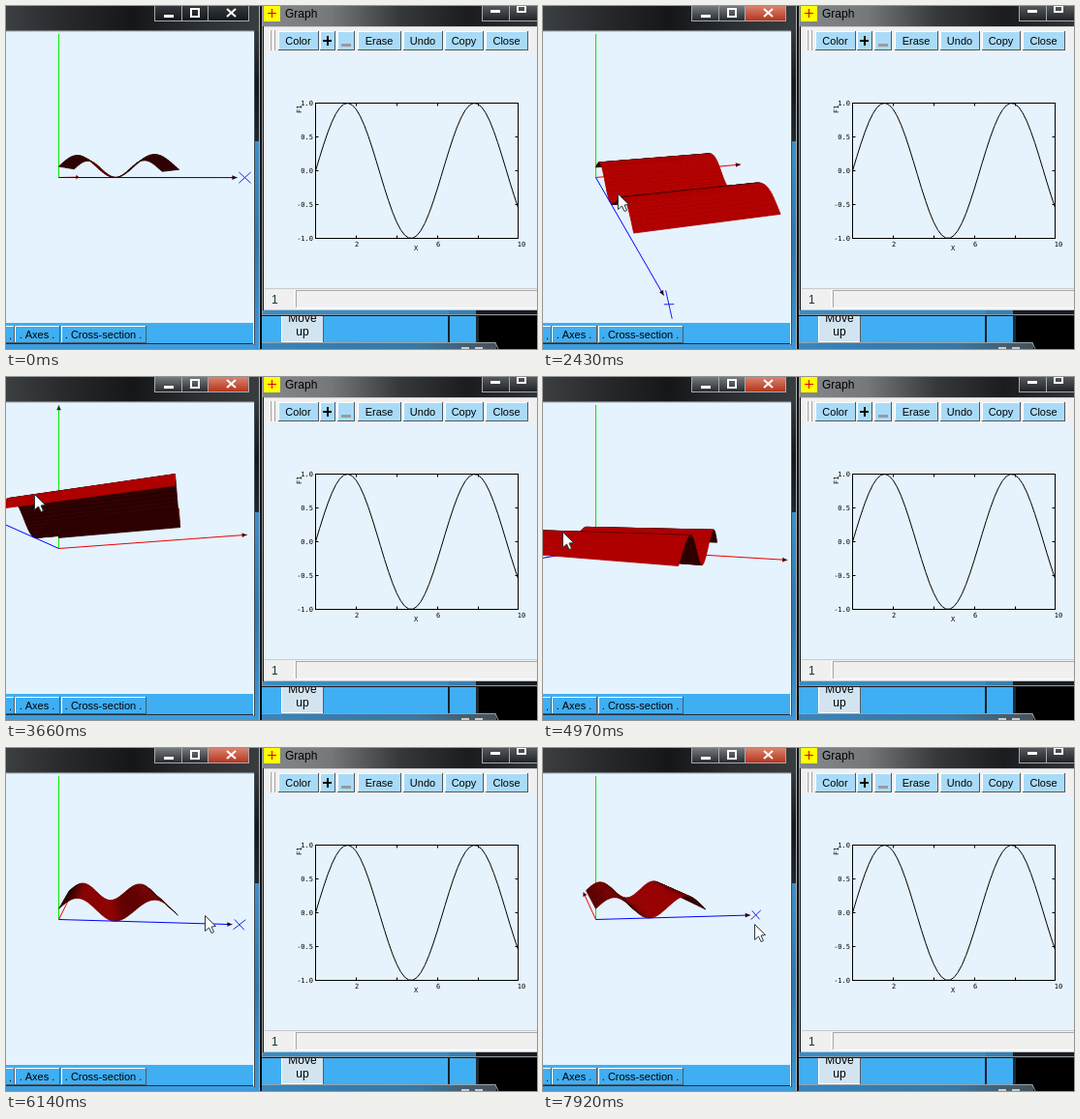
Recreate the animation shown at these times as an HTML page with a canvas. Size 548 by 355 pixels, loop 8000 ms.

```html
<!DOCTYPE html>
<html lang="en">
<head>
<meta charset="utf-8">
<title>Surface and graph</title>
<style>
html, body { margin: 0; width: 100%; height: 100%; overflow: hidden; background: #000; }
canvas { display: block; }
</style>
</head>
<body>
<canvas id="stage" width="548" height="355"></canvas>
<script>
const ctx = document.getElementById('stage').getContext('2d');
const LOOP = 8000, RAD = Math.PI / 180;
const SANS = '"Liberation Sans", Arial, sans-serif';
const MONO = '"DejaVu Sans Mono", monospace';
const BLUE = '#40aef2', PAPER = '#e4f3fd';

// Bursts of redraws: first time, last time, number of steps
const BURSTS = [
  [570, 1220, 6], [1490, 2430, 8], [2570, 3520, 8], [3660, 4550, 7],
  [4820, 5720, 8], [5870, 6840, 8], [6970, 7920, 8]
];

// Time, yaw, pitch, pointer x, pointer y
const POSES = [
  [570, 10.5, 0.2, 262, 160], [1220, 10.5, 0.2, 190, 172],
  [1624, 14.3, 12.1, 188, 175], [2430, 77.2, 23.3, 77, 194],
  [3660, 112, -10.4, 29, 121], [4949, 120, 6, 20, 160],
  [5870, 40, 13.5, 150, 190], [6147, 6.8, 13.9, 205, 173],
  [6840, -9, 10, 225, 162], [7380, -21, -7, 247, 142],
  [7920, -6.5, 14.4, 218, 182]
];

function rect(x, y, w, h, fill) {
  ctx.fillStyle = fill;
  ctx.fillRect(x, y, w, h);
}

function line(points, color, width = 1) {
  ctx.beginPath();
  points.forEach(([x, y]) => ctx.lineTo(x, y));
  ctx.strokeStyle = color;
  ctx.lineWidth = width;
  ctx.stroke();
}

function poly(points, fill, edge, width = 1) {
  ctx.beginPath();
  points.forEach(([x, y]) => ctx.lineTo(x, y));
  ctx.closePath();
  ctx.fillStyle = fill;
  ctx.fill();
  if (edge) {
    ctx.strokeStyle = edge;
    ctx.lineWidth = width;
    ctx.stroke();
  }
}

function text(str, x, y, size = 11, align = 'left', color = '#000', family = SANS) {
  ctx.font = size + 'px ' + family;
  ctx.textAlign = align;
  ctx.fillStyle = color;
  ctx.fillText(str, x, y);
}

function gradient(x0, y0, x1, y1, ...colors) {
  const g = ctx.createLinearGradient(x0, y0, x1, y1);
  colors.forEach((c, i) => g.addColorStop(i / (colors.length - 1), c));
  return g;
}

function button(x, y, w, h, label, fill) {
  rect(x, y, w, h, '#4c5a64');
  rect(x, y, w - 1, h - 1, '#fff');
  rect(x + 1, y + 1, w - 2, h - 2, fill);
  text(label, x + w / 2 - 0.5, y + h / 2 + 4, 11, 'center');
}

function sample(t) {
  const burst = BURSTS.filter(b => b[0] <= t).pop();
  if (!burst) return 0;
  const [from, to, n] = burst, step = (to - from) / (n - 1);
  return from + step * Math.min(n - 1, Math.floor((t - from) / step + 0.15));
}

function poseAt(t) {
  const i = POSES.findIndex(p => p[0] >= t);
  if (i < 0) return POSES[POSES.length - 1];
  if (i === 0) return POSES[0];
  const a = POSES[i - 1], b = POSES[i], u = (t - a[0]) / (b[0] - a[0]);
  return a.map((v, k) => v + (b[k] - v) * u);
}

function drawScene(yaw, pitch, started) {
  const SCALE = 12.1, DIST = 27, AXIS = 14, X_MAX = 9.75, Y_MAX = 9.75, STRIPS = 48;
  const sa = Math.sin(yaw * RAD), ca = Math.cos(yaw * RAD);
  const sp = Math.sin(pitch * RAD), cp = Math.cos(pitch * RAD);
  const cam = [DIST * sa * cp, -DIST * ca * cp, DIST * sp];

  function project(x, y, z) {
    const near = x * sa - y * ca;
    const m = SCALE / (1 - (near * cp + z * sp) / DIST);
    return [54.5 + (x * ca + y * sa) * m, 177.5 + (near * sp - z * cp) * m];
  }
  const height = x => 0.94 * (1 + Math.sin(x));

  function axis(end, color, tip) {
    const a = project(0, 0, 0), b = project(...end);
    line([a, b], color);
    const len = Math.hypot(b[0] - a[0], b[1] - a[1]) || 1;
    const ux = (b[0] - a[0]) / len, uy = (b[1] - a[1]) / len, h = Math.min(5, len / 8);
    poly([b, [b[0] - ux * h - uy * 2.3, b[1] - uy * h + ux * 2.3],
      [b[0] - ux * h + uy * 2.3, b[1] - uy * h - ux * 2.3]], tip);
  }

  function xAxis() {
    axis([AXIS, 0, 0], started ? '#0000ff' : '#1c0818', '#280010');
    const c = AXIS + 0.55, r = 0.42;
    line([project(c - r, 0, -r), project(c + r, 0, r)], '#2020e8');
    line([project(c - r, 0, r), project(c + r, 0, -r)], '#2020e8');
  }

  function strip(i) {
    const x0 = X_MAX * i / STRIPS, x1 = X_MAX * (i + 1) / STRIPS, x = (x0 + x1) / 2;
    const slope = Math.cos(x), len = Math.hypot(1, slope);
    const dx = cam[0] - x, dy = cam[1] - Y_MAX / 2, dz = cam[2] - height(x);
    const facing = (dz - slope * dx) / len / Math.hypot(dx, dy, dz);
    // Headlight leaning towards the positive x side
    const light = facing < 0 ? 0 : Math.max(0, facing - 0.12 * slope / len);
    const fill = `rgb(${Math.round(Math.min(176, 44 + light * 450))},0,0)`;
    poly([project(x0, 0, height(x0)), project(x1, 0, height(x1)),
      project(x1, Y_MAX, height(x1)), project(x0, Y_MAX, height(x0))], fill, fill, 0.8);
  }

  ctx.save();
  ctx.beginPath();
  ctx.rect(0, 29, 255, 298);
  ctx.clip();
  const xBehind = ca < 0 && sp > 0;
  axis([0, 0, 13.6], '#00ee00', '#003800');
  axis([0, AXIS, 0], '#ee0000', '#500000');
  if (xBehind) xAxis();
  // Paint the strips furthest from the viewer first
  const gap = i => Math.abs((i + 0.5) * X_MAX / STRIPS - cam[0]);
  Array.from({ length: STRIPS }, (_, i) => i)
    .sort((a, b) => gap(b) - gap(a))
    .forEach(strip);
  if (!xBehind) xAxis();
  ctx.restore();
}

function captionButton(x, w, top, bottom) {
  rect(x, 0, w, 16, gradient(0, 0, 0, 16, top, bottom));
  ctx.strokeStyle = '#a4aab0';
  ctx.lineWidth = 1;
  ctx.strokeRect(x + 0.5, -0.5, w - 1, 16);
}

function drawLeftWindow(active) {
  rect(0, 0, 262, 27, gradient(0, 0, 262, 0, '#3c3f42', '#26282a', '#141618', '#2c2f32', '#3a3d40'));
  const dark = active ? ['#777c81', '#24272a'] : ['#34383c', '#15171a'];
  captionButton(153, 29, ...dark);
  captionButton(181, 28, ...dark);
  captionButton(208, 43, ...(active ? ['#d88470', '#b43018'] : dark));
  rect(163, 9, 10, 3, '#fff');
  ctx.strokeStyle = '#fff';
  ctx.lineWidth = 2;
  ctx.strokeRect(191, 3, 8, 8);
  line([[228, 3], [237, 11]], '#fff', 2);
  line([[237, 3], [228, 11]], '#fff', 2);

  rect(0, 25, 256, 1, '#6c747a');
  rect(0, 26, 256, 1, '#c4ccd2');
  rect(0, 27, 255, 301, PAPER);
  rect(0, 328, 255, 21, BLUE);
  [[-30, 39, ''], [9, 47, '. Axes .'], [57, 88, '. Cross-section .']].forEach(([x, w, s]) =>
    button(x, 331, w, 18, s, BLUE));
  text('.', 3, 345);
  rect(0, 349, 256, 1, '#1c3040');
  rect(0, 350, 262, 5, '#3f9cdc');
  rect(255, 27, 1, 323, '#f4f8fa');
  rect(256, 26, 6, 114, gradient(0, 26, 0, 140, '#34383c', '#14181c', '#20282e'));
  rect(256, 140, 6, 215, gradient(0, 140, 0, 355, '#3d8fc8', '#2f78ac', '#3c98d8'));
  rect(256, 26, 1, 325, '#404a52');
  rect(261, 0, 1, 355, '#aab2b8');
  rect(262, 0, 2, 355, '#050607');
}

function drawBackdrop() {
  rect(0, 0, 548, 355, '#000');
  rect(262, 320, 195, 29, BLUE);
  rect(457, 320, 28, 28, BLUE);
  rect(456, 320, 2, 28, '#16222c');
  rect(485, 320, 3, 28, '#20282e');
  rect(284, 318, 44, 31, '#565c60');
  rect(284, 318, 43, 30, '#fff');
  rect(285, 318, 42, 29, '#d2e4f0');
  text('Move', 306, 327, 12, 'center');
  text('up', 306, 341, 12, 'center');
  rect(262, 348, 244, 7, gradient(262, 0, 506, 0, '#3a86bc', '#367cae', '#3a78a2', '#485058'));
  rect(262, 348, 243, 1, '#98a4ac');
  line([[505, 348.5], [508, 355]], '#98a4ac');
  rect(470, 353, 8, 2, '#ccc');
  rect(484, 353, 8, 2, '#ccc');
}

function drawPlot() {
  const X0 = 319.5, Y0 = 100.5, W = 209, H = 140;
  ctx.strokeStyle = '#000';
  ctx.lineWidth = 1;
  ctx.strokeRect(X0, Y0, W, H);
  for (let i = 1; i < 5; i++) {
    const x = Math.round(X0 + W * i / 5) + 0.5;
    line([[x, Y0], [x, Y0 + 3]], '#000');
    line([[x, Y0 + H], [x, Y0 + H - 3]], '#000');
  }
  for (let i = 0; i < 5; i++) {
    const y = Y0 + H * i / 4;
    line([[X0, y], [X0 + 3, y]], '#000');
    line([[X0 + W, y], [X0 + W - 3, y]], '#000');
    text((1 - i / 2).toFixed(1), 317, y + 2, 7, 'right', '#000', MONO);
  }
  [[2, 362], [6, 446], [10, 532]].forEach(([s, x]) => text(s, x, 249, 7, 'center', '#000', MONO));
  text('X', 423, 253, 7, 'center', '#000', MONO);
  ctx.save();
  ctx.translate(305, 111);
  ctx.rotate(-Math.PI / 2);
  text('F1', 0, 0, 7, 'left', '#000', MONO);
  ctx.restore();
  const curve = Array.from({ length: 51 }, (_, i) =>
    [X0 + W * i / 50, Y0 + H / 2 * (1 - Math.sin(i / 5))]);
  line(curve, '#000');
}

function drawGraphWindow() {
  rect(264, 0, 284, 321, '#191c1f');
  rect(264, 0, 284, 21, gradient(264, 0, 548, 0, '#85898c', '#74787b', '#36393c', '#1a1c1f', '#303336'));
  rect(266, 0, 17, 16, '#ffff00');
  rect(270, 7, 9, 1, '#e00000');
  rect(274, 3, 1, 9, '#e00000');
  text('Graph', 288, 12, 12);
  captionButton(491, 29, '#55595d', '#1d2023');
  captionButton(519, 30, '#55595d', '#1d2023');
  rect(500, 4, 10, 3, '#fff');
  ctx.strokeStyle = '#fff';
  ctx.lineWidth = 2;
  ctx.strokeRect(528, 0, 8, 6);

  rect(266, 21, 282, 1, '#c8ccd0');
  rect(266, 22, 1, 292, '#e8ecee');
  rect(267, 22, 281, 26, '#f0f0f0');
  [272, 276].forEach(x => {
    rect(x, 25, 1, 21, '#fff');
    rect(x + 1, 25, 1, 21, '#a0a0a0');
  });
  const fill = '#a9dbf8';
  [[281, 42, 'Color'], [324, 16, ''], [342, 18, ''], [363, 45, 'Erase'],
    [410, 41, 'Undo'], [453, 40, 'Copy'], [495, 44, 'Close']].forEach(([x, w, s]) =>
    button(x, 26, w, 20, s, fill));
  rect(327, 35, 9, 2, '#000');
  rect(331, 31, 2, 10, '#000');
  rect(346, 39, 10, 3, '#9a9a9a');

  rect(267, 48, 281, 244, '#e6f3fd');
  rect(267, 292, 281, 1, '#c8ccd0');
  rect(267, 293, 281, 21, '#f0f0f0');
  rect(297, 294, 1, 18, '#fff');
  rect(299, 294, 249, 1, '#a8a8a8');
  rect(299, 294, 1, 18, '#a8a8a8');
  rect(299, 312, 249, 1, '#fff');
  text('1', 274, 308, 12, 'left', '#143830');
  rect(266, 314, 282, 1, '#c8ccd0');
  // The lower frame is glass over the blue panel
  rect(265, 315, 192, 4, '#3a8cc4');
  rect(457, 315, 28, 4, '#3580b4');
  rect(264, 319, 284, 1, '#8c969c');
  rect(264, 0, 1, 320, '#9aa0a4');
  drawPlot();
}

function drawPointer(x, y) {
  const shape = [[0, 0], [0, 16], [4, 12.5], [6.5, 18], [9, 17], [6.5, 11.5], [11, 11]];
  poly(shape.map(([dx, dy]) => [x + dx + 0.5, y + dy + 0.5]), '#fff', '#303840');
}

function draw(t) {
  const started = t >= 570;
  const [, yaw, pitch, px, py] = poseAt(sample(t));
  drawBackdrop();
  drawGraphWindow();
  drawLeftWindow(started);
  drawScene(yaw, pitch, started);
  if (started) drawPointer(Math.round(px), Math.round(py));
}

const begin = performance.now();
function tick() {
  draw((performance.now() - begin) % LOOP);
  requestAnimationFrame(tick);
}
tick();
</script>
</body>
</html>
```
